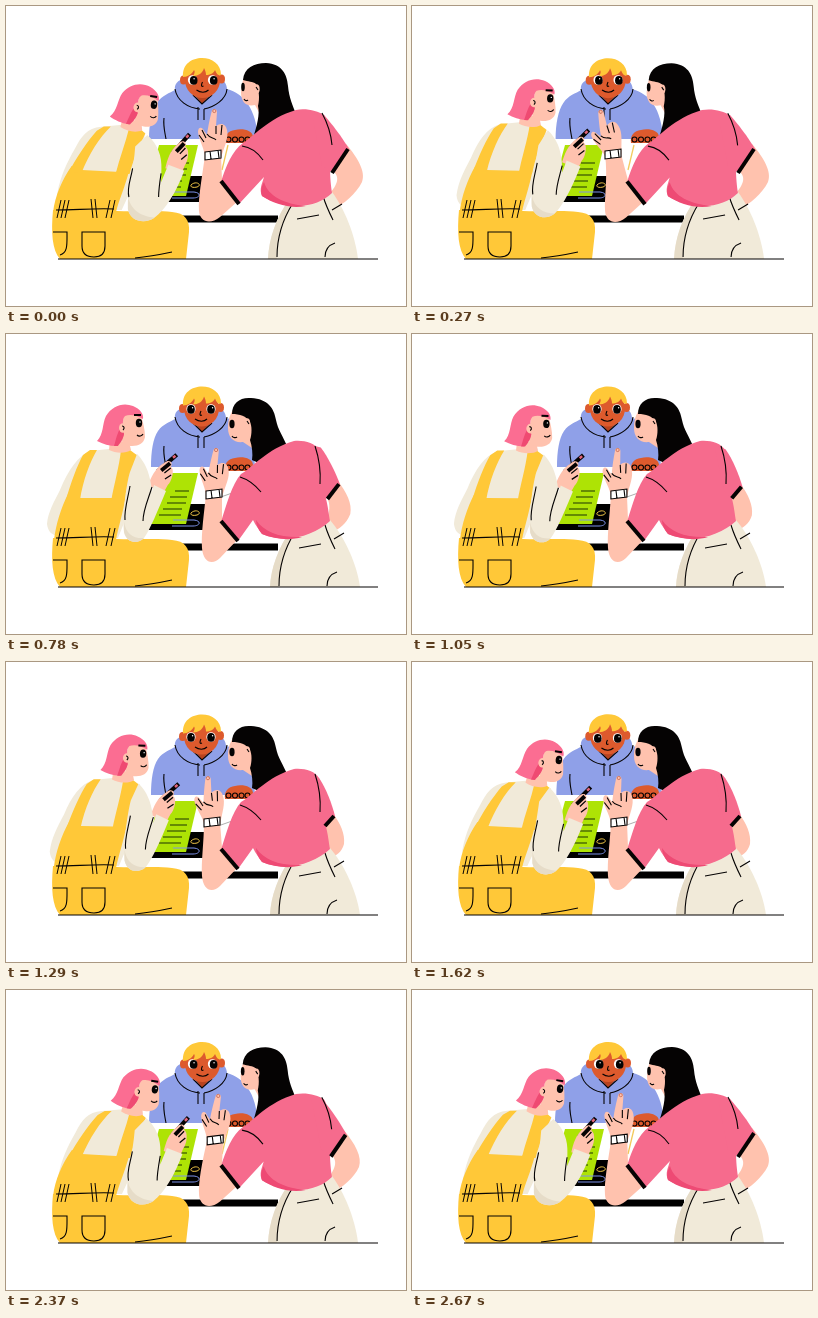
Recreate the animation shown at these times as an HTML page with a canvas. Size 400 px wide and 300 px high, loop 2.7 s.

```html
<!DOCTYPE html>
<html lang="en">
<head>
<meta charset="utf-8">
<title>Team at a table</title>
<style>
html, body { margin: 0; width: 100%; height: 100%; overflow: hidden; background: #fff; }
canvas { display: block; width: 400px; height: 300px; }
</style>
</head>
<body>
<canvas width="400" height="300"></canvas>
<script>
const ctx = document.querySelector('canvas').getContext('2d');
const LOOP = 2700, STEP = 30;
const TIMES = [0, 270, 780, 1290, 1620, 2070];
const INK = '#050303', SKIN = '#ffc2ae', CREAM = '#f1ead9', SHADE = '#e6dcc8', YELLOW = '#ffc838',
  SHIRT = '#f66b8d', HAIR = '#fb6d92', BROWN = '#dd5a2d', HOODIE = '#8fa0e8', GREEN = '#aee305';

// Smooth periodic curve through one value per entry of TIMES, without overshoot.
function key(t, values) {
  const n = TIMES.length;
  const value = i => values[(i + n) % n];
  const time = i => TIMES[(i + n) % n] + Math.floor(i / n) * LOOP;
  const rate = i => (value(i + 1) - value(i)) / (time(i + 1) - time(i));
  const slope = i => {
    const a = rate(i - 1), b = rate(i);
    return a * b <= 0 ? 0 : 2 * a * b / (a + b);
  };
  let i = n - 1;
  while (TIMES[i] > t) i--;
  const span = time(i + 1) - time(i), u = (t - time(i)) / span;
  const ease = u * u * (3 - 2 * u);
  return value(i) + (value(i + 1) - value(i)) * ease
    + span * u * (1 - u) * (slope(i) * (1 - u) - slope(i + 1) * u);
}

const lerp = (a, b, k) => a + (b - a) * k;

// Blends two path strings that have the same commands.
function mix(a, b, k) {
  const number = /-?\d+(\.\d+)?/g, ends = b.match(number);
  let i = 0;
  return a.replace(number, n => lerp(+n, +ends[i++], k).toFixed(2));
}

function fill(color, path) {
  ctx.fillStyle = color;
  ctx.fill(new Path2D(path));
}

function line(path, width = 1.1, color = INK) {
  ctx.strokeStyle = color;
  ctx.lineWidth = width;
  ctx.stroke(new Path2D(path));
}

function oval(color, x, y, rx, ry = rx) {
  ctx.fillStyle = color;
  ctx.beginPath();
  ctx.ellipse(x, y, rx, ry, 0, 0, 7);
  ctx.fill();
}

function at(x, y, degrees, draw, scale = 1) {
  ctx.save();
  ctx.translate(x, y);
  ctx.rotate(degrees * Math.PI / 180);
  ctx.scale(scale, scale);
  draw();
  ctx.restore();
}

function boy(t) {
  const k = key(t, [0, .3, 1, 1, .7, .1]);
  fill(HOODIE, mix(
    'M143 133 C143 118 146 104 151 97 C156 89 164 87 169 84 C168 78 172 74 178 73 L214 73 C220 75 221 81 221 83 C238 88 250 102 252 133Z',
    'M145 133 C145 118 147 104 152 97 C157 90 164 88 169 85 C168 78 172 75 178 74 L213 74 C219 76 220 82 220 84 C236 88 248 102 249 133Z', k));
  line('M169 83 C171 95 182 102 194 103 M221 83 C220 94 208 101 198 103 M192 101 V114 M198 103 V114');
  line('M158 112 C157 120 159 127 160 133');
  fill('#b8431f', 'M187 87 L206 87 L196 98Z');
  line('M187 89 L196 98 L206 89');
  at(lerp(.5, -.5, k), k * .5, 0, () => {
    oval(BROWN, 177, 74, 3.5, 4.5);
    oval(BROWN, 215, 73, 3.5, 4.5);
    oval(BROWN, 196, 74, 17.5, 18);
  });
  at(lerp(.5, -1, k), key(t, [0, 0, 1, 1, 2, 0]), 0, () => {
    for (const x of [186, 206]) {
      oval('#fff', x, 74, 4.6, 4.8);
      oval(INK, x + lerp(1.2, 0, k), 74.4, 3.8, 4.4);
      oval('#fff', x + 1.6, 72.8, .7);
    }
    line('M196 76 C194 80 195 81 197 80 M190 84 C194 87 199 87 202 84');
  });
  at(0, k * .5, 0, () => fill(YELLOW,
    'M177 71 C176 58 186 52 196 52 C206 52 215 58 215 69 C213 70 211 69 209 64 C208 67 204 69 200 69 C200 66 199 64 198 62 C197 67 192 70 187 70 C189 67 189 65 188 64 C186 68 182 71 177 71Z'));
}

function table(lean) {
  fill('#000', 'M146 170 H200 L197 196 H130Z M150 209.4 H272 V216.6 H150Z');
  fill(GREEN, 'M153 139 L192 139 L180 190 L139 190Z');
  line('M169 157 H183 M164 163 H181 M161 169 H180 M157 175 H176 M153 181 H175', 1.1, '#1d3504');
  line('M185 179 C190 174 197 179 191 181 C187 182 184 181 185 179', 1, '#f0c648');
  line('M167 186 H188 C196 187 194 192 187 192 H166', 1, '#7d92e8');
  ctx.globalAlpha = 1 - lean;
  line('M222 139 L216 164', 1.3, '#f2c95a');
  ctx.globalAlpha = lean;
  line('M212 164 L229 158', .8, '#999');
  ctx.globalAlpha = 1;
  fill(BROWN, 'M219 137 C218 129 222 125 229 124 C236 122 247 124 247 131 V137Z');
  for (const x of [222.5, 229, 235.5, 241.5]) {
    line(`M${x - 2.5} 133.5 a2.5 2.5 0 1 1 5 0 a2.5 2.5 0 1 1 -5 0`);
  }
}

function pointingHand() {
  fill(SKIN, 'M-8 3 C-8 -6 -14 -14 -15 -23 C-15 -28 -11 -29 -9 -24 L-6 -20 C-5 -28 -3 -37 -1.5 -43 C-1 -47 4 -47 4 -43 L3 -29 C8 -33 13 -31 14 -25 C16 -17 11 -8 8 3Z');
  line('M-11 -25 L-7 -17 M-6 -21 C-3 -16 1 -18 3 -15 M3 -29 L3 -21 M9 -30 L8 -20 M-14 -20 L-9 -13');
  line('M-.3 -44 a1.6 1.6 0 1 1 3.2 0 a1.6 1.6 0 1 1 -3.2 0', .9, '#c9705c');
}

function watch() {
  fill('#fff', 'M-8 -3 L8 -5 L8 3 L-8 5Z');
  line('M-8 -3 L8 -5 L8 3 L-8 5Z M-3 -4 L-2 4 M5 -5 L6 3');
}

function rightWoman(t, lean) {
  const arm = key(t, [0, 0, .65, 1, 1, .45]);
  const wx = key(t, [207, 201, 208, 206, 207, 210]);
  const wy = key(t, [149, 148, 160, 160, 160, 151]);
  const blend = (a, b) => mix(a, b, lean);

  fill(SKIN, blend(
    'M240 68 C236 74 236 80 235 86 C235 96 240 101 249 99 L256 112 L258 70Z',
    'M229 74 C223 80 222 88 222 94 C222 104 228 109 237 108 L246 114 L248 78Z'));
  fill(INK, blend(
    'M237 74 C238 62 248 57 260 57 C276 58 281 68 282 80 C283 92 287 100 290 108 L262 134 L247 132 C251 120 254 108 252 100 C254 92 253 84 250 78 C247 75 242 76 237 74Z',
    'M226 80 C226 69 234 63 245 64 C262 65 268 74 270 86 C272 96 277 102 281 112 L264 134 L246 126 C247 120 246 112 244 106 C246 100 246 92 244 88 C240 82 234 80 226 80Z'));
  at(lerp(-.5, -10, lean), lerp(0, 6, lean), 0, () => oval(SKIN, 251, 83, 3.2, 4.8));
  oval(INK, lerp(237, 226, lean), lerp(81, 90, lean), lerp(1.8, 2.6, lean), 4.2);
  line(blend('M238 93 C239 95 241 95 242 94', 'M226 102 C227 104 230 104 231 103'));
  line(blend('M250 81 L252 84', 'M241 87 L243 90'));

  fill(SKIN, mix(
    'M340 138 C352 152 360 166 356 176 C350 188 338 198 326 204 L322 190 C330 180 336 172 326 164Z',
    'M326 150 C335 162 339 172 338 182 C336 190 330 194 324 196 L320 188 C320 176 319 170 318 163Z', arm));
  const seat = blend('M284 192 C270 212 263 232 262 253', 'M286 194 C272 214 265 234 264 253');
  const crease = blend('C272 232 275 216 288 194', 'C274 234 277 218 290 196');
  fill(CREAM, seat + blend('L352 253 C349 228 338 202 326 186Z', 'L354 253 C351 230 338 202 324 186Z'));
  fill(SHADE, seat + ' h9 ' + crease + 'Z');
  at(lean * 2, lean, 0, () => line(
    'M287 197 C275 216 271 234 271 251 M317 190 C320 200 324 208 327 214 M291 213 L313 209 M326 204 L336 198 M319 251 C319 244 323 239 329 237'));

  fill(SKIN, `M${wx - 8} ${wy} L${wx + 8} ${wy}` + blend(
    'L216 174 L232 195 L214 211 C204 219 194 216 193 205 C192 192 196 172',
    'L216 186 L232 205 L214 224 C206 232 197 228 196 214 C195 200 198 180') + ` ${wx - 8} ${wy}Z`);
  at(wx, wy, key(t, [0, -18, 1, -7, -2, 3]), pointingHand);
  at(wx, wy, 0, watch);

  fill(SHIRT, blend(
    'M290 104 C300 102 312 105 318 109 C324 118 326 140 324 160 C324 172 325 180 326 187 C312 201 284 206 256 190 C253 183 256 178 258 171 L233 198 L215 176 C220 160 226 145 237 137 C246 132 262 112 290 104Z',
    'M288 107 C298 106 309 109 313 116 C318 126 320 150 320 165 C322 172 323 182 324 187 C308 202 280 210 256 200 C252 194 250 192 247 186 L232 207 L215 188 C220 172 226 150 235 140 C246 134 262 114 288 107Z'));
  fill(SHIRT, mix(
    'M306 108 L318 109 C326 118 336 131 343 143 L327 167 L316 160Z',
    'M302 112 L313 116 C320 126 326 142 329 154 L319 164 L312 158Z', arm));
  fill('#ee4a74', blend(
    'M258 176 C262 190 278 198 300 200 C284 203 268 198 256 190 C254 184 256 180 258 176Z',
    'M250 186 C258 198 274 204 296 203 C284 207 268 205 256 200 C252 195 250 191 250 186Z'));
  line(mix('M342 143 L326 167', 'M328 154 L319 164', arm), 4);
  line(blend('M215 175 L233 198', 'M215 187 L232 207'), 4);
  line(blend('M316 107 C322 118 325 128 326 139', 'M309 112 C313 124 315 136 314 150'));
  line(blend('M236 140 C244 141 252 147 257 154', 'M234 143 C244 146 250 152 255 158'));
}

function leftHead() {
  fill(SKIN, 'M-13 14 L6 16 L8 24 C2 28 -8 27 -14 24Z');
  fill(SKIN, 'M1 -13 L18 -11 C20 -4 22 4 22 11 C21 17 16 20 9 20 C4 20 -2 18 -2 10Z');
  fill(HAIR, 'M-26 15 C-19 8 -21 -2 -17 -10 C-11 -20 0 -24 10 -20 C17 -17 21 -12 20 -7 C13 -11 7 -12 2 -10 C-2 -6 1 2 1 8 C0 13 -4 17 -6 20 C-14 20 -20 18 -26 15Z');
  fill('#ef4a72', 'M-1 0 C-6 6 -7 14 -9 20 L-5 20 C-3 17 0 14 1 8Z');
  oval(SKIN, 0, 2, 4, 4.8);
  line('M-1 0 C1 0 2 2 0 4');
  oval(INK, 16, -3, 3.2, 4.2);
  oval('#fff', 17, -4, .7);
  line('M11 -11 L18 -11', 2);
  line('M14 9 C16 11 19 10 20 8');
}

function writingHand() {
  line('M-4 -2 L11 -18', 3.6);
  line('M8 -15 L10 -17', 2.2, '#e4667c');
  fill(SKIN, 'M-11 11 C-9 4 -7 -4 1 -10 C5 -14 9 -11 7 -7 C11 -5 9 6 6 9 L3 16Z');
  line('M-1 -3 L6 -10', 3.4);
  line('M7 -6 L2 -1 M8 0 L3 4');
}

function leftWoman(t) {
  const k = key(t, [.08, .68, 1, .75, .15, 0]);
  const arm = key(t, [-.3, .4, 1, .8, .2, 0]);
  const blend = (a, b) => mix(a, b, k);

  fill(CREAM, blend(
    'M96 121 C82 122 76 130 70 142 C62 156 56 168 52 188 C52 196 56 202 70 204 L116 204 C128 180 140 150 139 127 L120 119Z',
    'M84 117 C72 122 62 136 54 156 C48 168 42 178 41 190 C42 198 46 201 52 202 L112 204 C122 180 134 150 132 121 L112 114Z'));
  fill(YELLOW, blend(
    'M66 160 L76 164 L110 166 L124 163 C119 182 113 194 110 206 L47 206 C49 190 56 174 66 160Z',
    'M62 160 L74 164 L106 164 L120 160 C117 180 112 194 110 206 L48 206 C50 190 55 174 62 160Z'));
  fill(YELLOW, blend(
    'M92 125 L99 121 L106 121 C94 132 84 148 76 166 L62 168 C72 150 82 136 92 125Z',
    'M77 121 L84 116 L91 116 C84 128 77 146 74 166 L60 166 C65 148 71 132 77 121Z'));
  fill(YELLOW, blend(
    'M124 122 L132 121 L140 128 C134 140 127 156 124 168 L110 168 C114 152 120 138 124 122Z',
    'M115 116 L124 116 L132 122 C126 138 121 152 118 168 L105 168 C108 150 113 134 115 116Z'));
  fill(YELLOW, 'M47 204 L111 205 C130 206 150 204 166 206 C179 207 184 214 183 226 L180 253 L54 253 C46 244 45 226 47 204Z');

  line('M50 204 C70 204 90 202 108 203');
  for (const x of [53, 57, 61, 102, 107]) line(`M${x + 2} 194 L${x - 2} 212`, 1);
  for (const x of [86, 90]) line(`M${x - 1} 193 L${x + 1} 212`, 1);
  line('M76 226 H99 V240 C99 248 95 251 88 251 C80 251 76 248 76 240Z');
  line('M47 226 H61 C61 238 62 247 54 249');
  line('M129 252 C140 251 152 249 166 246');

  at(lerp(168, 156, arm), lerp(147, 140, arm), lerp(0, 6, arm), writingHand, 1.15);
  fill(CREAM, mix(
    'M139 127 C149 136 153 148 153 160 L153 172 L159 157 L174 163 C166 184 156 202 146 210 C138 216 124 215 121 202 C120 186 126 160 128 140Z',
    'M131 120 C139 128 143 138 145 150 L146 158 L148 151 L160 157 C152 176 144 196 138 204 C132 210 121 210 118 198 C116 186 120 150 124 138Z', arm));
  fill(SHADE, mix(
    'M121 190 C124 204 134 209 146 210 C138 216 124 215 121 202Z',
    'M118 188 C120 200 128 205 138 204 C132 210 121 210 118 198Z', arm));
  line(mix(
    'M153 164 C151 174 149 182 149 190 M126 160 C124 172 120 180 122 190',
    'M146 153 C142 166 137 176 137 187 M124 152 C122 164 118 176 119 186', arm));
  at(lerp(133, 117, k), lerp(100, 92, k), lerp(9, 0, k), leftHead);
}

const start = performance.now();

function frame() {
  const t = Math.floor((performance.now() - start) % LOOP / STEP) * STEP;
  const lean = key(t, [0, .03, 1, 1, 1, .1]);
  ctx.fillStyle = '#fff';
  ctx.fillRect(0, 0, 400, 300);
  boy(t);
  table(lean);
  rightWoman(t, lean);
  leftWoman(t);
  line('M52 253 H372', 1.2);
  requestAnimationFrame(frame);
}

frame();
</script>
</body>
</html>
```
